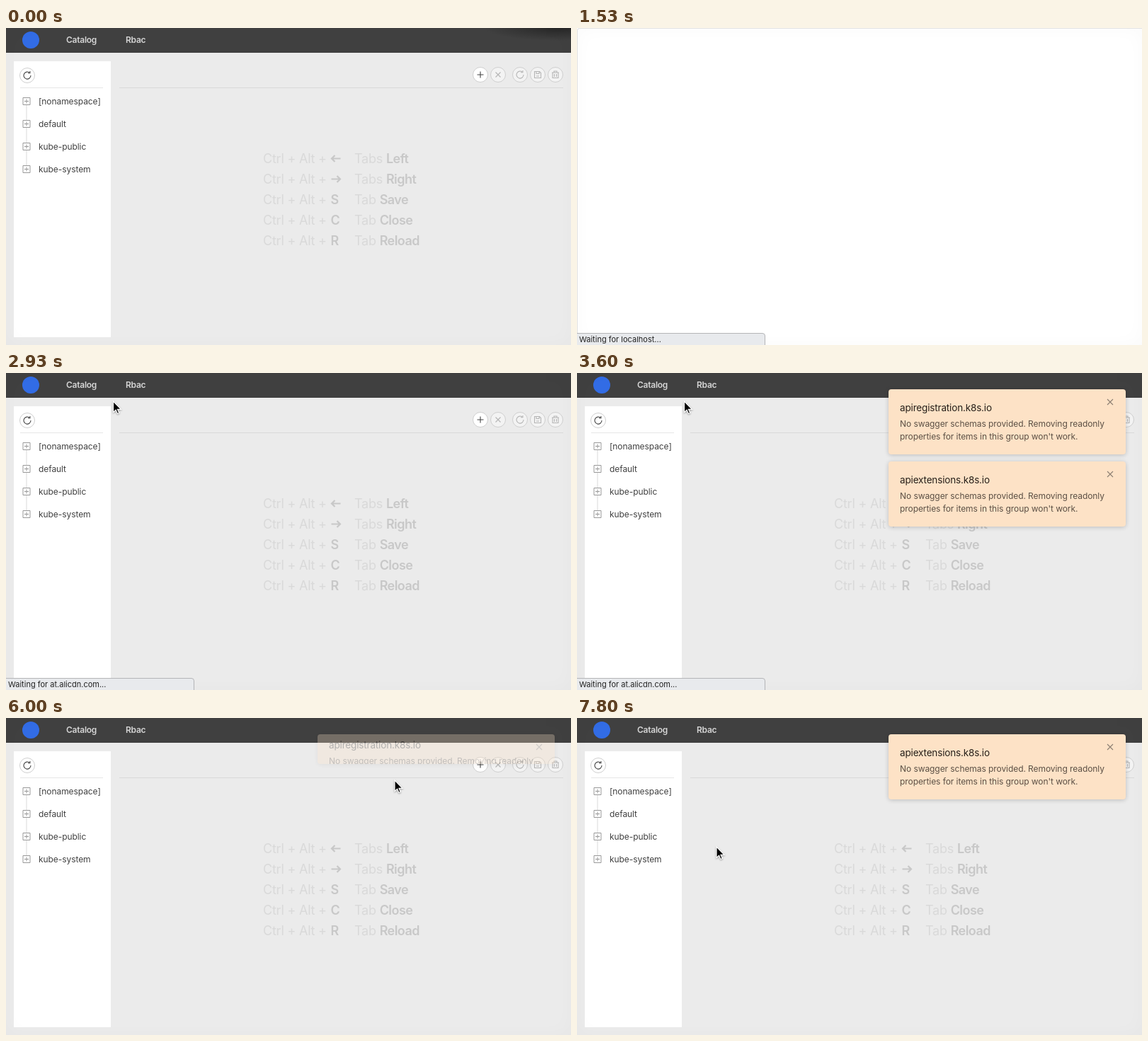
These frames come from a looping animation (798x448 px, 8000 ms). An HTML page:

```html
<!DOCTYPE html>
<html>
<head>
<meta charset="utf-8">
<style>
html, body { margin: 0; width: 100%; height: 100%; overflow: hidden; background: #fff; }
body { position: relative; font: 12px Inter, "Open Sans", sans-serif; letter-spacing: -.07px; }
svg { position: absolute; left: 0; top: 0; }
text { white-space: pre; }
#page { background: #ebebeb; }
#edge { position: absolute; inset: 0; box-shadow: inset 0 0 26px rgba(0,0,0,.025); }
#edge.blank { border: solid #e2e2e2; border-width: 1px 0 0 1px; border-radius: 4px 0 0 0; }
#toasts { position: absolute; left: 440px; top: 23px; width: 335px; }
.toast { position: relative; box-sizing: border-box; height: 92px; padding: 16px; margin-bottom: 10px; overflow: hidden;
  border-radius: 4px; background: #fde2c6; box-shadow: 0 1px 6px rgba(0,0,0,.2); line-height: 18px; color: #5c5045; white-space: nowrap; }
.toast b { display: block; font-weight: 400; font-size: 13.5px; letter-spacing: -.16px; line-height: 20px; margin-bottom: 4px; color: #261f19; }
.toast svg { left: 308px; top: 13px; }
#status { position: absolute; left: -1px; top: 431px; width: 262px; height: 18px; padding-left: 3px;
  border: 1px solid #b4b5b7; border-radius: 0 4px 0 0; background: #e8eaed; font-size: 11px; letter-spacing: 0; line-height: 17px; color: #222; }
</style>
</head>
<body>
<svg id="page" width="798" height="448">
  <defs>
    <radialGradient id="dim"><stop offset="0" stop-opacity=".4"/><stop offset="1" stop-opacity="0"/></radialGradient>
    <g id="reload" fill="none"><path d="M3.4-3.6A5 5 0 1 0 5 0"/><path d="M3.9-6V-3.2H1"/></g>
  </defs>
  <path fill="#404040" d="M0 0h798v35H0z"/>
  <ellipse id="shade" cx="780" cy="0" rx="105" ry="18" fill="url(#dim)"/>
  <circle cx="35" cy="17" r="12" fill="#326ce5"/>
  <g font-weight="600" fill="#d6d6d6" letter-spacing="-.25"><text x="85" y="21">Catalog</text><text x="169" y="21">Rbac</text></g>
  <path fill="#fff" d="M11 47h137v390H11z"/>
  <path stroke="#d9d9d9" d="M160 84.5h627M29 109v86"/>
  <path stroke="#e6e6e6" d="M20 84.5h117"/>
  <g id="tree" fill="#404040"></g>
  <g id="buttons"></g>
  <g id="keys" font-size="18" letter-spacing="-.22"></g>
</svg>
<div id="edge"></div>
<div id="toasts"></div>
<div id="status"></div>
<svg id="cursor" width="18" height="24" viewBox="-2 -2 18 24" style="filter:drop-shadow(0 1px 1px rgba(0,0,0,.35))">
  <path d="M0 0V15.5L3.6 12.2L5.9 17.5L8.3 16.5L6 11.3H11Z" stroke="#fff" stroke-width="1.2"/>
</svg>
<script>
const $ = id => document.getElementById(id);

$('tree').innerHTML = ['[nonamespace]', 'default', 'kube-public', 'kube-system'].map((name, i) => {
  const y = 103.5 + 32 * i;
  return `<path fill="#fff" stroke="#999" d="M24 ${y - 5}h10v10h-10zM26 ${y}h6M29 ${y - 3}v6"/>
    <text x="46" y="${y + 4.5}">${name}</text>`;
}).join('');

const reload = '<use href="#reload"/>';
const dark = '#444', pale = '#b5b5b5';
$('buttons').innerHTML = [
  [30, 67, dark, reload],
  [670, 66, dark, '<path d="M-4.5 0h9M0-4.5v9"/>'],
  [695, 66, pale, '<path d="M-3.5-3.5l7 7m0-7l-7 7"/>'],
  [726, 66, pale, reload],
  [751, 66, pale, '<path d="M-4.5-4.5h7l2 2v7h-9zM-2-4.5v3h4v-3M-2 2h4"/>'],
  [776, 66, pale, '<path d="M-5-3H5M-2-3v-2h4v2M-4-3v7.5h8V-3M-1.5-1v4M1.5-1v4"/>']
].map(([x, y, color, icon]) => `<g transform="translate(${x} ${y})" fill="none" stroke="${color}" stroke-width="1.1">
  <circle r="10.5" fill="${x > 680 ? '#f3f3f3' : '#fff'}" stroke="#cfcfcf" stroke-width="1"/>${icon}</g>`).join('');

$('keys').innerHTML = [
  ['←', 'Tabs', 'Left'], ['→', 'Tabs', 'Right'], ['S', 'Tab', 'Save'], ['C', 'Tab', 'Close'], ['R', 'Tab', 'Reload']
].map(([key, noun, verb], i) => {
  const y = 191 + 29 * i;
  const arrow = `<path transform="translate(466 ${y - 6.5})${i ? '' : ' scale(-1 1)'}" fill="none" stroke="#c8c8c8" stroke-width="2.2" d="M-6.5 0H6M1.5-4.5L6 0L1.5 4.5"/>`;
  const bold = 'font-weight="600" fill="#c8c8c8" letter-spacing="-.55"';
  return `<text x="363" y="${y}" fill="#d9d9d9">Ctrl + Alt +</text>
    ${i < 2 ? arrow : `<text x="458.5" y="${y}" ${bold}>${key}</text>`}
    <text x="492" y="${y}" fill="#d9d9d9">${noun} <tspan ${bold}>${verb}</tspan></text>`;
}).join('');

$('toasts').innerHTML = ['apiregistration', 'apiextensions'].map(name => `<div class="toast"><b>${name}.k8s.io</b>
  No swagger schemas provided. Removing readonly<br>properties for items in this group won't work.
  <svg width="10" height="10"><path stroke="#8d8073" stroke-width="1.1" d="M1 1l8 8m0-8l-8 8"/></svg></div>`).join('');
const [first, second] = document.querySelectorAll('.toast');

const clamp = v => Math.min(1, Math.max(0, v));
const ramp = (t, start, length) => clamp((t - start) / length);
const circ = x => x < .5 ? (1 - Math.sqrt(1 - 4 * x * x)) / 2 : (1 + Math.sqrt(1 - (2 - 2 * x) ** 2)) / 2;

// time, x, y of the pointer
const path = [
  [1930, 118, 10], [2530, 152, 40], [3670, 152, 40], [4460, 168, 112], [4530, 165, 104], [4866, 165, 104],
  [4933, 322, 133], [5400, 470, 221], [5750, 545, 140], [6000, 549.5, 88], [6600, 520, 200],
  [7000, 420, 250], [7400, 309, 182], [7600, 309, 182], [7800, 197.5, 182]
];
function pointer(t) {
  const i = path.findIndex(p => p[0] > t);
  if (i < 0) return path[path.length - 1].slice(1);
  const [t0, x0, y0] = path[i - 1], [t1, x1, y1] = path[i];
  const k = (t - t0) / (t1 - t0);
  return [x0 + (x1 - x0) * k, y0 + (y1 - y0) * k];
}

function slideIn(el, k) {
  el.style.opacity = k;
  el.style.left = 384 * (1 - k) + 'px';
}

function draw(t) {
  const blank = t >= 1460 && t < 2920;
  $('page').style.visibility = blank ? 'hidden' : '';
  $('edge').className = blank ? 'blank' : '';
  $('shade').style.opacity = 1 - ramp(t, 0, 130);

  $('status').style.opacity = ramp(t, 330, 200) * (1 - ramp(t, 3800, 260));
  $('status').textContent = `Waiting for ${t < 2130 ? 'localhost' : 'at.alicdn.com'}...`;

  const gone = circ(ramp(t, 5868, 240)), rest = 1 - gone;
  slideIn(first, circ(ramp(t, 3200, 240)));
  slideIn(second, circ(ramp(t, 3260, 240)));
  first.style.opacity *= rest;
  first.style.height = (gone ? Math.min(92, 150 * rest) : 92) + 'px';
  first.style.padding = `${16 * rest}px 16px`;
  first.style.marginBottom = 10 * rest + 'px';
  if (gone) second.style.opacity = ramp(t, 6100, 180);

  const cursor = $('cursor');
  cursor.style.visibility = t < 1930 ? 'hidden' : '';
  if (t >= 1930) {
    const [x, y] = pointer(t);
    cursor.style.transform = `translate(${x - 2.5}px, ${y - 2}px)`;
  }
}

const start = performance.now();
function tick() {
  const t = (performance.now() - start) % 8000;
  draw(Math.floor(t * .015 + .05) / .015); // 15 steps a second
  requestAnimationFrame(tick);
}
tick();
</script>
</body>
</html>
```
